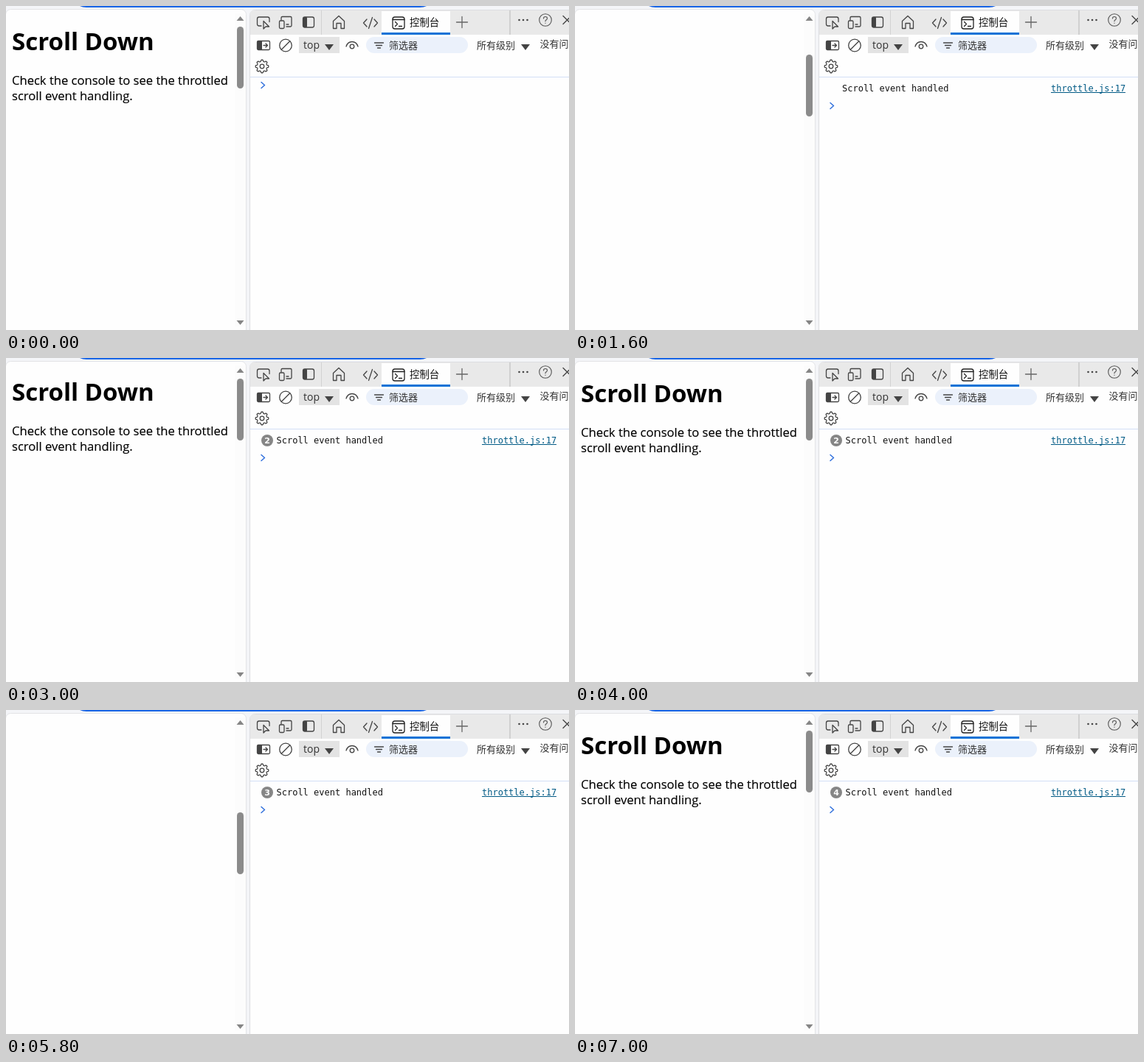
An HTML page that plays this animation: 763 by 440 pixels, repeating every 8.6 s.

```html
<!DOCTYPE html>
<html lang="zh">
<head>
<meta charset="utf-8">
<title>Scroll throttle</title>
<style>
  html, body { margin: 0; width: 100%; height: 100%; overflow: hidden; background: #f4f5f8; }
  svg { display: block; width: 100%; height: 100%; }
  text { white-space: pre; }
  .page { font: 16.6px "Open Sans", "Noto Sans", sans-serif; fill: #000; stroke: #000; stroke-width: .15; }
  .page .title { font-size: 33px; font-weight: 700; stroke: none; }
  .ui { font: 13px "Noto Sans CJK SC", "Noto Sans CJK", sans-serif; fill: #333; }
  .log { font: 12px "DejaVu Sans Mono", monospace; fill: #111; }
  .icon { fill: none; stroke: #444; stroke-width: 1.3; stroke-linecap: round; stroke-linejoin: round; }
  .solid { fill: #444; }
  .arrow { fill: #858585; }
</style>
</head>
<body>
<svg viewBox="0 0 763 440" xmlns="http://www.w3.org/2000/svg">
  <defs>
    <clipPath id="pane"><rect y="5" width="310" height="435"/></clipPath>
    <path id="down" d="M0 0H12L6 8Z"/>
  </defs>

  <rect width="763" height="440" fill="#f4f5f8"/>
  <path d="M100 0H570Q566 2 561 2H109Q104 2 100 0Z" fill="#1a66e6"/>

  <!-- page pane -->
  <rect x="-.5" y="4.5" width="326" height="450" rx="7" fill="#fefefe" stroke="#e2e3e6"/>
  <rect x="310" y="10" width="15" height="425" fill="#fcfcfc"/>
  <g clip-path="url(#pane)">
    <g id="content" class="page">
      <text class="title" x="8" y="60">Scroll Down</text>
      <text x="8" y="107">Check the console to see the throttled</text>
      <text x="8" y="128">scroll event handling.</text>
    </g>
  </g>
  <path class="arrow" d="M312.5 20l5-6l5 6ZM312.5 427l5 6l5-6Z"/>
  <rect id="thumb" x="313" width="9" height="84" rx="4.5" fill="#8b8b8b"/>

  <!-- tools pane -->
  <rect x="330.5" y="5.5" width="450" height="450" rx="7" fill="#fefefe" stroke="#dcdde1"/>
  <path d="M331 39V12Q331 6 337 6H763V39Z" fill="#e9e9e9"/>
  <path d="M427.5 6V39" stroke="#d2d2d2"/>
  <path d="M683 6V39" stroke="#d0d0d0" stroke-width="2"/>
  <rect x="509" y="7" width="93" height="32" fill="#fefefe"/>
  <rect x="509" y="36" width="93" height="3" fill="#0a72d6"/>
  <path d="M331 96.5H763" stroke="#d2dff6"/>
  <rect x="397" y="42" width="55" height="22" fill="#e3e3e3"/>
  <rect x="488" y="42" width="138" height="22" rx="11" fill="#ebf1fb"/>

  <g class="icon">
    <!-- inspect, devices, dock -->
    <path d="M346 27h-3q-2.500 0-2.500-2.500v-7q0-2.500 2.500-2.500h11.500q2.500 0 2.500 2.500v4M349 20.500v10.500l3-3h4.500z"/>
    <path d="M373 19v-3q0-1.500 1.500-1.500h11q1.500 0 1.500 1.500v10.500q0 1.500-1.500 1.500h-5.500M380 25h3"/>
    <rect x="370.5" y="20" width="6.500" height="10.500" rx="1.500"/>
    <rect x="402.5" y="15" width="15" height="14" rx="2.500"/>
    <!-- home, elements, console, add -->
    <path d="M443.500 20.500l7.500-7l7.500 7v10h-4.500v-7h-6v7h-4.500z"/>
    <path d="M489 18l-4.500 5l4.500 5M499 18l4.500 5l-4.500 5M496.500 15.500l-5 15"/>
    <g stroke="#222">
      <rect x="524" y="15" width="16" height="16" rx="3"/>
      <path d="M524 18.500h16M527.500 21.500l3 3l-3 3M532.500 27.500h4"/>
    </g>
    <path d="M610.500 22h15M618 14.500v15" stroke="#666"/>
    <!-- help, close -->
    <g stroke="#555" stroke-width="1.1">
      <circle cx="731" cy="19" r="8.300"/>
      <path d="M728.500 17q0-2.500 2.500-2.500t2.500 2.300q0 1.200-1.500 2.200t-1 2M731 23.300v.2"/>
    </g>
    <path d="M755 13.500l11 11M755 24.500l11-11"/>
    <!-- sidebar, clear, watch, filter, settings -->
    <rect x="340.5" y="47.5" width="17" height="12" rx="1.500"/>
    <path d="M349 53.500h5M352 51l2.500 2.500l-2.500 2.500"/>
    <circle cx="379" cy="53.500" r="8.300"/>
    <path d="M373.300 59.300l11.400-11.600"/>
    <path d="M461 55q2-6.500 8-6.500t8 6.500"/>
    <circle cx="469" cy="55" r="2.800"/>
    <path d="M499.500 50h12M501.500 53.500h8M503.500 57h4"/>
    <circle cx="347" cy="82" r="2.800"/>
    <path id="gear"/>
    <path id="prompt" d="M346 103.500l4.500 4l-4.500 4" stroke="#2f6fdc" stroke-width="1.5"/>
  </g>
  <g class="solid">
    <rect x="403" y="15" width="5" height="14" rx="1"/>
    <rect x="341" y="48" width="6" height="11"/>
    <use href="#down" x="432" y="52"/>
    <use href="#down" x="698" y="52"/>
    <circle cx="695.5" cy="19" r="1.300"/>
    <circle cx="701" cy="19" r="1.300"/>
    <circle cx="706.5" cy="19" r="1.300"/>
  </g>

  <g class="ui">
    <text x="547" y="27" fill="#111" style="font-size:13.4px">控制台</text>
    <text x="403" y="58" style="font:14px 'Open Sans','Noto Sans',sans-serif">top</text>
    <text x="519" y="58">筛选器</text>
    <text x="638" y="58">所有级别</text>
    <text x="723.5" y="56">没有问</text>
  </g>

  <g id="entry" class="log">
    <g id="badge">
      <circle cx="354" cy="112" r="8" fill="#868686"/>
      <text id="count" x="354" y="116" text-anchor="middle" style="fill:#fff;font:700 11px 'DejaVu Sans',sans-serif"></text>
    </g>
    <text id="message" y="116">Scroll event handled</text>
    <text x="645" y="116" fill="#005a85" style="fill:#005a85">throttle.js:17</text>
    <path d="M645 117.5H746" stroke="#005a85"/>
  </g>
</svg>
<script>
const LOOP = 8600, STEP = 100, PAGE_PER_THUMB = 5.1;
const FIRST_LOG = 900, THROTTLE = 1900, LAST_SCROLL = 7000;

// Each trip scrolls down to a peak and glides back to the top.
const trips = [
  { start: 800, peak: 1300, end: 2000, reach: 152 },
  { start: 2000, peak: 2400, end: 3060, reach: 149 },
  { start: 3060, peak: 3400, end: 4000, reach: 173 },
  { start: 4000, peak: 4300, end: 4800, reach: 150 },
  { start: 4800, peak: 5100, end: 5640, reach: 148 },
  { start: 5640, peak: 6000, end: 6400, reach: 173 },
  { start: 6500, peak: 6800, end: 7000, reach: 98 }
];
const el = id => document.getElementById(id);

function thumbTravel(t) {
  const trip = trips.find(({ start, end }) => t >= start && t < end);
  if (!trip) return 0;
  const { start, peak, end, reach } = trip;
  return t < peak
    ? reach * Math.sin((t - start) / (peak - start) * Math.PI / 2)
    : reach * ((end - t) / (end - peak)) ** 2.5;
}

function gearPath(cx, cy, teeth) {
  const points = Array.from({ length: teeth * 10 }, (_, i) => {
    const a = i / (teeth * 10) * 2 * Math.PI;
    const r = 7.8 + Math.tanh(3 * Math.cos(teeth * a));
    return `${(cx + r * Math.cos(a)).toFixed(2)} ${(cy + r * Math.sin(a)).toFixed(2)}`;
  });
  return `M${points.join("L")}Z`;
}

function render(ms) {
  const t = Math.floor(ms % LOOP / STEP) * STEP;
  const travel = thumbTravel(t);
  el("content").setAttribute("transform", `translate(0 ${-Math.round(travel * PAGE_PER_THUMB)})`);
  el("thumb").setAttribute("y", 28 + Math.round(travel));

  const logs = Math.max(0, Math.floor((Math.min(t, LAST_SCROLL) - FIRST_LOG) / THROTTLE) + 1);
  el("entry").style.display = logs ? "" : "none";
  el("badge").style.display = logs > 1 ? "" : "none";
  el("count").textContent = logs;
  el("message").setAttribute("x", logs > 1 ? 366.5 : 362);
  el("prompt").setAttribute("transform", `translate(0 ${logs ? 28 : 0})`);
}

el("gear").setAttribute("d", gearPath(347, 82, 8));
const start = performance.now();
function tick() {
  render(performance.now() - start);
  requestAnimationFrame(tick);
}
render(0);
requestAnimationFrame(tick);
</script>
</body>
</html>
```
